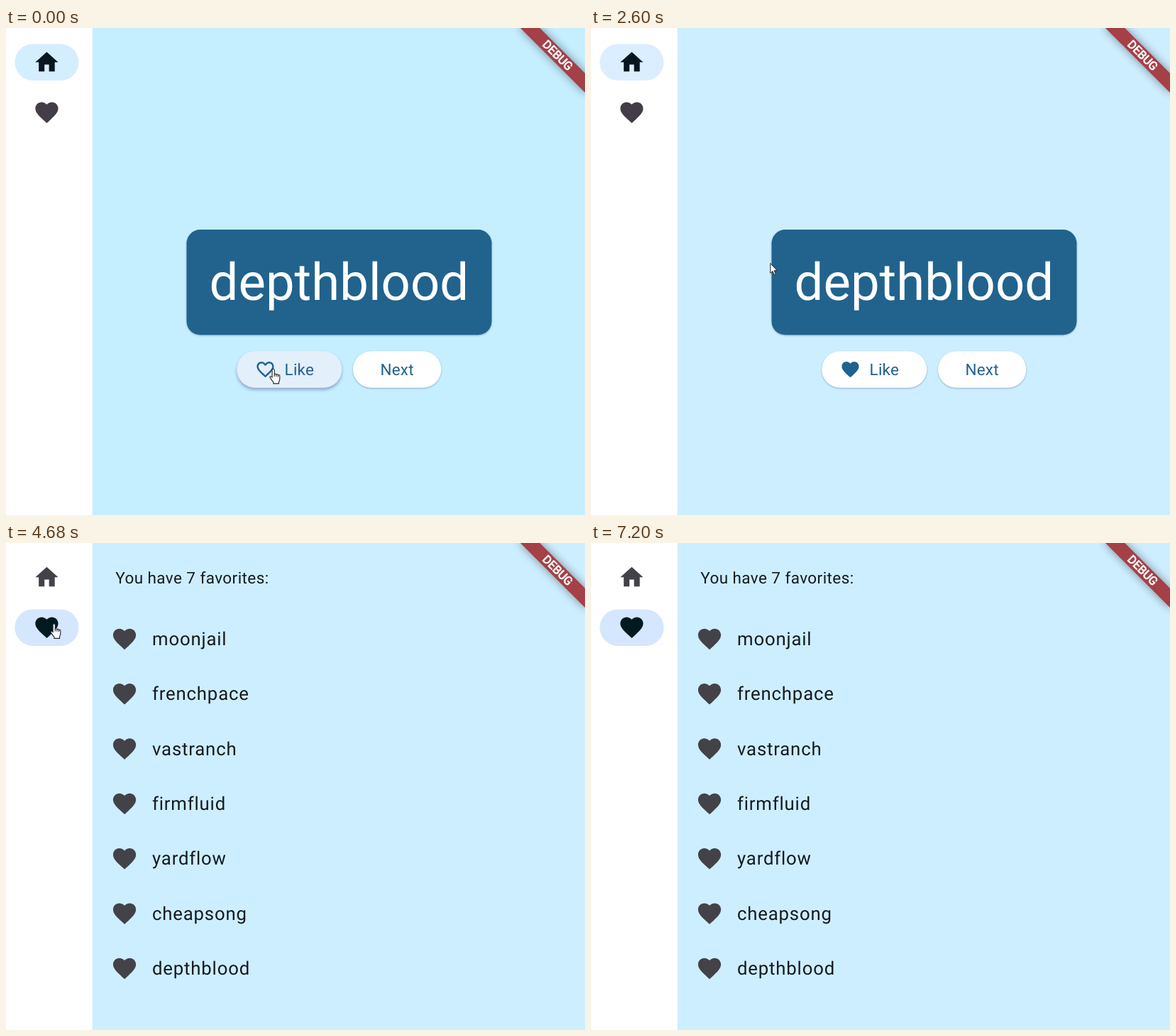
An HTML page for the animation above (7.24 s loop, 816x686 px).

```html
<!DOCTYPE html>
<html>
<head>
<meta charset="utf-8">
<style>
html, body { margin: 0; width: 100%; height: 100%; overflow: hidden; background: #fff; }
svg { display: block; width: 816px; height: 686px; font-family: Roboto, Arial, sans-serif; text-rendering: geometricPrecision; }
.raised { filter: drop-shadow(0 1.5px 1.2px rgba(50, 60, 110, .38)); }
.label { font-size: 22.55px; letter-spacing: .16px; fill: #20628d; }
.row { font-size: 25.78px; letter-spacing: .806px; fill: #151a20; }
</style>
</head>
<body>
<svg viewBox="0 0 816 686">
  <defs>
    <path id="heart" d="M12 21.35l-1.45-1.32C5.4 15.36 2 12.28 2 8.5 2 5.42 4.42 3 7.5 3c1.74 0 3.41.81 4.5 2.09C13.09 3.81 14.76 3 16.5 3 19.58 3 22 5.42 22 8.5c0 3.78-3.4 6.86-8.55 11.54z"/>
    <rect id="pill" width="90.2" height="51.5" rx="25.75"/>
    <clipPath id="pillClip"><use href="#pill" x="12.3" y="93.4"/></clipPath>
    <filter id="soft" x="-20%" y="-150%" width="140%" height="400%"><feGaussianBlur stdDeviation="6.2"/></filter>
  </defs>
  <rect width="816" height="686" fill="#fff"/>
  <rect id="page" x="121.7" width="694.3" height="686"/>

  <use id="homePill" href="#pill" x="12.3" y="22.5"/>
  <path id="homeIcon" d="M10 20v-6h4v6h5v-8h3L12 3 2 12h3v8z" transform="translate(38.1 29) scale(1.611)"/>
  <use id="likesPill" href="#pill" x="12.3" y="93.4"/>
  <g clip-path="url(#pillClip)"><circle id="splash" cy="118"/></g>
  <use id="likesIcon" href="#heart" transform="translate(38.1 99.6) scale(1.611)"/>

  <g id="generator">
    <rect class="raised" x="254.5" y="284" width="430" height="148.3" rx="19.3" fill="#21638d"/>
    <text x="469.4" y="383.2" font-size="72.5" text-anchor="middle" fill="#fff">depthblood</text>
    <rect id="like" x="325.3" y="455.3" width="148" height="51.5" rx="25.75"/>
    <g transform="translate(351 466.5) scale(1.208)" fill="#20628d">
      <use id="liked" href="#heart"/>
      <path id="unliked" d="M16.5 3c-1.74 0-3.41.81-4.5 2.09C10.91 3.81 9.24 3 7.5 3 4.42 3 2 5.42 2 8.5c0 3.78 3.4 6.86 8.55 11.54L12 21.35l1.45-1.32C18.6 15.36 22 12.28 22 8.5 22 5.42 19.58 3 16.5 3zm-4.4 15.55l-.1.1-.1-.1C7.14 14.24 4 11.39 4 8.5 4 6.5 5.5 5 7.5 5c1.54 0 3.04.99 3.57 2.36h1.87C13.46 5.99 14.96 5 16.5 5c2 0 3.5 1.5 3.5 3.5 0 2.89-3.14 5.74-7.9 10.05z"/>
    </g>
    <text class="label" x="392.6" y="489">Like</text>
    <rect class="raised" x="489" y="455.3" width="124.3" height="51.5" rx="25.75" fill="#fff"/>
    <text class="label" x="527.5" y="489">Next</text>
  </g>

  <g id="favorites">
    <text x="154.2" y="56.7" font-size="22.55" letter-spacing=".403" fill="#151a20">You have 7 favorites:</text>
  </g>

  <g transform="translate(816 0) rotate(45)">
    <rect x="-64.4" y="45.1" width="128.9" height="19.3" fill="#000" opacity=".42" filter="url(#soft)"/>
    <rect x="-66" y="45.1" width="132" height="19.3" fill="#a54047"/>
    <text y="60" font-size="16.43" text-anchor="middle" fill="#fff" stroke="#fff" stroke-width=".8">DEBUG</text>
  </g>

  <g id="cursor" fill="#fff" stroke="#20232a" stroke-linejoin="round">
    <path id="arrow" d="M.5.5V14.5L3.7 11.6 5.8 16.6 8 15.7 5.9 10.8H10z"/>
    <g id="hand" transform="translate(-6.9 -.6)" stroke-width="1.1">
      <path d="M4 2.5a1.6 1.6 0 0 1 3.2 0V8.5a1.4 1.4 0 0 1 2.6.6 1.4 1.4 0 0 1 2.6.7 1.3 1.3 0 0 1 2.3 1V15q0 2-1.3 3.8V21.5H5.8V19.5Q3.6 17 1.2 13.2C.2 11.3 2.4 10.4 4 12.8z"/>
      <path d="M7.2 8.5V11.5M9.8 9.1V11.8M12.4 9.8V12" fill="none"/>
    </g>
  </g>
</svg>
<script>
const LOOP = 7240, LIKE = 1600, PRESS = 3270, OPEN = 3880;
const $ = id => document.getElementById(id);
const set = (id, name, value) => $(id).setAttribute(name, value);
const show = (id, on) => set(id, 'visibility', on ? 'visible' : 'hidden');
const ramp = (t, a, b) => Math.min(1, Math.max(0, (t - a) / (b - a)));
const ease = u => u * u * (3 - 2 * u);
const mix = (a, b, u) => `rgb(${a.map((v, i) => v + (b[i] - v) * u)})`;
const within = ([x, y], l, t, r, b) => x > l && x < r && y > t && y < b;

const WHITE = [255, 255, 255], HOVER = [228, 239, 252], PRESSED = [199, 221, 239];
const NAV_HOVER = [236, 255, 255], NAV_PRESSED = [223, 221, 245], SELECTED = [213, 230, 255];

['moonjail', 'frenchpace', 'vastranch', 'firmfluid', 'yardflow', 'cheapsong', 'depthblood'].forEach((word, i) => {
  const y = 135.1 + i * 77.35;
  $('favorites').insertAdjacentHTML('beforeend',
    `<use href="#heart" fill="#434248" transform="translate(147.7 ${y - 19.3}) scale(1.611)"/>
     <text class="row" x="206" y="${y + 8.8}">${word}</text>`);
});

// Stops of the pointer: start time, end time, x, y
const moves = [[2250, 3050, 69, 113.5], [5400, 5780, 135, 117.5], [6800, 7120, -14, 190]];
function pointer(t) {
  let x = 378, y = 480;
  for (const [a, b, nx, ny] of moves) {
    const u = ease(ramp(t, a, b));
    x += (nx - x) * u;
    y += (ny - y) * u;
  }
  return [x, y];
}

function draw(t) {
  const p = pointer(t), open = t >= OPEN;
  const onLike = !open && within(p, 325, 455, 473, 507);
  const onNav = within(p, 12, 93, 103, 145);
  set('page', 'fill', t < 2320 ? '#c5eeff' : '#cdeeff');
  show('generator', !open);
  show('favorites', open);

  const down = ramp(t, 1450, 1600) * (1 - ramp(t, 1720, 1950));
  set('like', 'fill', down ? mix(HOVER, PRESSED, down) : mix(HOVER, WHITE, ramp(t, 2420, 2560)));
  $('like').style.filter = onLike
    ? 'drop-shadow(0 3px 2.2px rgba(70,70,130,.42))'
    : 'drop-shadow(0 1.5px 1.2px rgba(50,60,110,.38))';
  show('liked', !open && t >= LIKE);
  show('unliked', t < LIKE);

  const fade = ramp(t, 3930, 4180);
  set('homePill', 'fill', open ? '#d5e6ff' : t < 2320 ? '#d4eefe' : '#dbeeff');
  set('homePill', 'opacity', 1 - fade);
  set('homeIcon', 'fill', open ? '#434248' : '#08171f');
  set('likesIcon', 'fill', open ? '#001a20' : t < LIKE || t >= 2320 ? '#433d48' : '#444b4b');
  set('likesPill', 'fill', fade ? mix(NAV_PRESSED, SELECTED, fade) : mix(NAV_HOVER, NAV_PRESSED, ramp(t, 3340, 3900)));
  set('likesPill', 'opacity', open ? 1 : ramp(t, 2930, 3060));

  const grow = ramp(t, 3320, 3920);
  set('splash', 'cx', 68 - 3 * grow);
  set('splash', 'r', 14 + 17 * grow + 30 * fade);
  set('splash', 'fill', mix([240, 232, 252], [204, 221, 220], grow));
  set('splash', 'opacity', ramp(t, PRESS, 3310) * (1 - fade));

  const hand = onLike || onNav;
  set('cursor', 'transform', `translate(${p})`);
  show('hand', hand);
  show('arrow', !hand);
}

let start;
function tick(now) {
  start ??= now;
  draw((now - start) % LOOP);
  requestAnimationFrame(tick);
}
draw(0);
requestAnimationFrame(tick);
</script>
</body>
</html>
```
